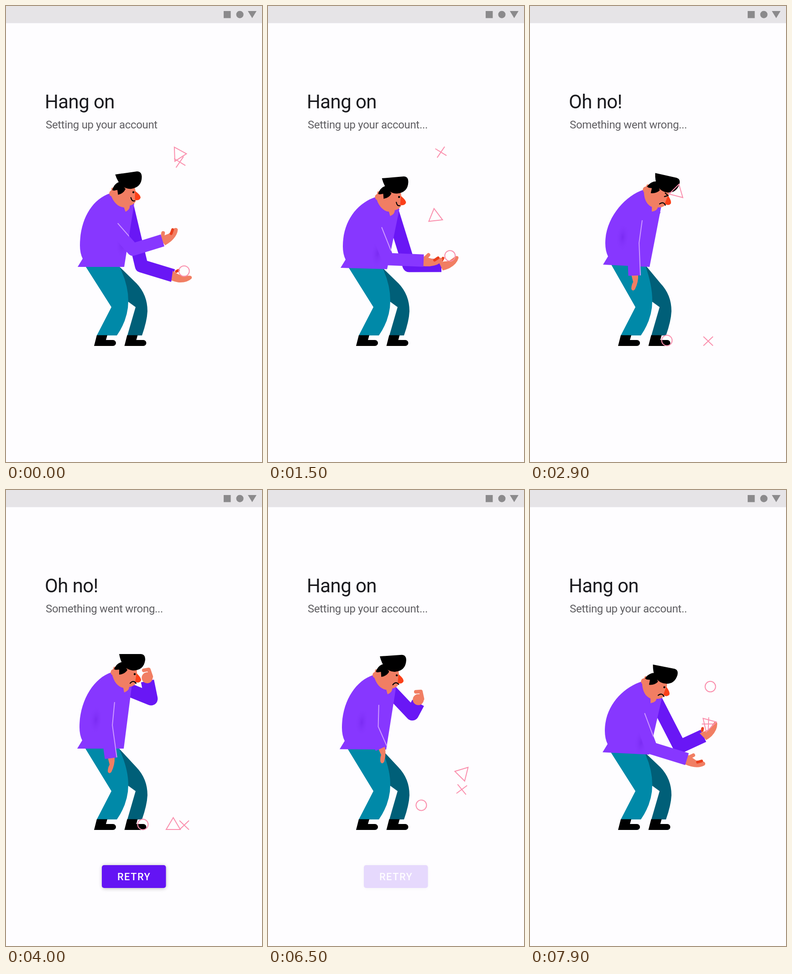
Animation of 561x998 px, one loop 8 s. Source, as an HTML page:

```html
<!DOCTYPE html>
<html lang="en">
<head>
<meta charset="utf-8">
<title>Account setup</title>
<style>
  html, body { margin: 0; width: 100%; height: 100%; overflow: hidden; background: #fefdff; }
  svg { display: block; width: 100vw; height: 100vh; }
  text { font-family: Roboto, sans-serif; }
  .title { font-size: 42px; letter-spacing: -.6px; fill: #1b1b1f; }
  .sub { font-size: 24px; letter-spacing: -.32px; fill: #5f5e62; }
  .label { font-size: 21.8px; font-weight: 500; letter-spacing: 1.5px; fill: #fff; }
  .skin { fill: #f17e63; }
  .sleeve { fill: none; stroke-linejoin: round; }
  .finger { fill: none; stroke: #f17e63; stroke-width: 8; stroke-linecap: round; stroke-linejoin: round; }
  .red { stroke: #ea3f1c; stroke-width: 6; }
  .line { fill: none; stroke: #000; stroke-width: 2.2; stroke-linecap: round; }
  .toy { fill: none; stroke: #fa8fad; stroke-width: 2; }
</style>
</head>
<body>
<svg viewBox="0 0 561 998">
  <defs>
    <radialGradient id="shade">
      <stop offset="0" stop-color="#6d20e6" stop-opacity=".5"/>
      <stop offset="1" stop-color="#8737ff" stop-opacity="0"/>
    </radialGradient>
    <clipPath id="side"><path id="sidePath"/></clipPath>
    <filter id="blur" x="-20%" y="-50%" width="140%" height="200%"><feGaussianBlur stdDeviation="4"/></filter>
  </defs>
  <rect width="561" height="998" fill="#fefdff"/>
  <rect width="561" height="37.5" fill="#e6e4e7"/>
  <g fill="#8b8a8c">
    <rect x="477" y="11" width="15.5" height="15.5"/>
    <circle cx="512.5" cy="18.7" r="8"/>
    <path d="M530 11h19l-9.5 15.5z"/>
  </g>

  <g id="wait">
    <text class="title" x="85" y="224">Hang on</text>
    <text class="sub" x="87" y="267.5" id="dots"></text>
  </g>
  <g id="fail">
    <text class="title" x="85" y="224">Oh no!</text>
    <text class="sub" x="87" y="267.5">Something went wrong...</text>
  </g>

  <path id="farArm" class="sleeve" stroke="#6917f5" stroke-width="29"/>
  <g id="farPalm">
    <path class="skin" d="M-2-10Q10-4 20-2L37-5Q43-4 41 1Q32 12 13 13Q5 13-2 11Z"/>
    <path class="finger red" d="M6-10L10-13"/>
  </g>
  <g id="farFist">
    <circle class="skin" cy="-7" r="12"/>
    <path class="finger" d="M-6-24L5-25L9-9"/>
  </g>

  <path id="farLeg" fill="#005f78"/>
  <path id="nearLeg" fill="#0089a8"/>
  <path id="shoe" d="M199 720.5H222L219 731H234.5A6.5 6.5 0 0 1 234.5 744H193Z"/>
  <use href="#shoe" x="66.5"/>

  <path id="torso" fill="#8737ff"/>
  <ellipse id="fold" rx="15" ry="32" fill="url(#shade)"/>
  <g id="head">
    <path class="skin" d="M-4 2C0 22 10 32 21 34L23 44Q34 40 34 32Q50 30 52 14L50-12H0Z"/>
    <path d="M0-5Q6-21 20-23L30-5Q24 4 12 5L12-6Z"/>
    <circle class="skin" r="6.8"/>
    <path fill="#fb4019" d="M50 2Q61 12 60 18Q56 25 47 21Z"/>
    <path d="M12-40H60Q70-39 69-27Q66-4 42-4Q18-6 12-40Z"/>
    <circle id="eye" cx="46" cy="4" r="2.2"/>
    <path id="wince" class="line" d="M43-2L50 2L43 6"/>
    <path id="smile" class="line" d="M39 15Q40 24 46 23"/>
    <path id="frown" class="line" d="M36 24Q43 16 49 24"/>
  </g>

  <g id="nearPalm">
    <path class="skin" d="M-2-10Q10-6 20-3L37-5Q43-3 41 2Q32 12 13 13Q5 13-2 12Z"/>
    <path class="finger" d="M1-3L11-12"/>
    <path id="tuck" class="finger red" d="M24 0L32-5"/>
  </g>
  <path id="nearHang" class="skin" d="M-7-2H8Q9 14 1 30Q-4 36-7 29Q-7 21-3 14Z"/>
  <path id="nearArm" class="sleeve" stroke="#8737ff" stroke-width="27"/>
  <path id="seam" class="sleeve" stroke="#cf9bff" stroke-width="2" clip-path="url(#side)"/>

  <path id="tri" class="toy" d="M0-17L15.5 9H-15.5Z"/>
  <path id="cross" class="toy" d="M-10.5-10L10.5 10M10.5-10L-10.5 10"/>
  <circle id="ring" class="toy" r="11.5"/>

  <g id="button">
    <rect id="shadow" x="211" y="823" width="139" height="50" rx="5" fill="#000" filter="url(#blur)"/>
    <rect x="210" y="821" width="140.5" height="50" rx="5" fill="#6414f4"/>
    <rect id="glow" x="210" y="821" width="140.5" height="50" rx="5" fill="#9055f8"/>
    <text class="label" x="244" y="854">RETRY</text>
  </g>
  <circle id="touch" cx="281" cy="845.5" r="33.5" fill="#f9567f"/>
</svg>
<script>
const LOOP = 8000, BEAT = 1200, DROP = 2000, RESUME = 7200;
const el = {};
document.querySelectorAll('[id]').forEach(e => el[e.id] = e);

const clamp = v => Math.min(1, Math.max(0, v));
const smooth = v => { v = clamp(v); return v * v * (3 - 2 * v); };
const ramp = (t, a, b) => smooth((t - a) / (b - a));
const mix = (a, b, k) => a.map((v, i) => v + (b[i] - v) * k);
const easeIn = k => 1 - Math.cos(k * Math.PI / 2);
const easeOut = k => Math.sin(k * Math.PI / 2);
const set = (id, name, value) => el[id].setAttribute(name, value);
const show = (id, v) => set(id, 'opacity', +v);
const place = (id, x, y, r = 0) => set(id, 'transform', `translate(${x} ${y}) rotate(${r})`);

// neck, chest, hem, hem tilt, head turn | near shoulder, elbow, wrist, hand turn | far elbow, wrist, hand turn
const low   = [228,410, 281,432, 157,571, 0, -8,  235,484, 278,533, 343,513, -38,  297,569, 366,590, 8];
const mid   = [236,418, 288,444, 159,573, 3, -5,  237,489, 263,554, 341,557, -2,   309,568, 380,568, -25];
const high  = [245,419, 290,451, 159,574, 5, 11,  239,493, 266,565, 344,589, 16,   328,562, 380,538, -44];
const hurt  = [249,402, 288,437, 160,566, 5, 12.5, 233,467, 226,518, 229,590, 0,   236,520, 236,545, 0];
const think = [231,399, 276,426, 156,566, 0, 0,   225,463, 220,515, 230,587, 0,    318,457, 310,418, -5];
const sorry = [232,403, 281,428, 157,566, 1, -4,  228,465, 211,516, 215,584, 0,    323,462, 316,422, 0];
const lowSad = low.slice();
lowSad[7] = -4;

function swing(p, base) {
  if (p < .25) return mix(base, mid, easeIn(p / .25));
  if (p < .5) return mix(mid, high, easeOut((p - .25) / .25));
  if (p < .6) return high;
  if (p < .8) return mix(high, mid, easeIn((p - .6) / .2));
  return mix(mid, base, easeOut((p - .8) / .2));
}
const beat = t => (t / BEAT) % 1;

const keys = [[DROP, swing(beat(DROP), low)], [2550, hurt], [3150, hurt], [3800, think],
  [4100, think], [4500, sorry], [6250, sorry], [7000, lowSad], [RESUME, lowSad]];

function poseAt(t) {
  if (t < DROP) return swing(beat(t), low);
  if (t >= RESUME) return swing(beat(t - RESUME), lowSad);
  const i = keys.findIndex(k => t < k[0]);
  const [t0, a] = keys[i - 1], [t1, b] = keys[i];
  const pose = mix(a, b, ramp(t, t0, t1));
  if (t > 4500 && t < 5500) pose[19] += 5 * Math.sin((t - 4500) * Math.PI / 250);
  return pose;
}

// spot above the far palm, with its turn
function palm(pose) {
  const [x, y, turn] = pose.slice(17), a = turn * Math.PI / 180;
  return [x + 26 * Math.cos(a) + 11 * Math.sin(a), y + 26 * Math.sin(a) - 11 * Math.cos(a), turn];
}

// a throw goes between two spots (x, y, turn); falls list time, spot and bounce height
const toys = {
  tri:   { start: .65, len: .68, rise: 202, from: [396, 500, -116], to: [362, 550, 279],
           falls: [[2900, 322, 407, 14, 90], [3450, 366.5, 734, 360, 50]] },
  cross: { start: .84, len: .66, rise: 238, from: [382, 500, -12], to: [377, 570, -12],
           falls: [[2450, 390.5, 733.5, 180, 40]] },
  ring:  { start: .525, len: .45, rise: 185, from: [396, 505, 0], to: [390, 580, 0],
           falls: [[2700, 300, 732, 0, 70]] }
};

function juggle(toy, p, hand, first) {
  const { start, len, rise, from, to } = toy;
  const since = (p - start + 1) % 1, u = since / len;
  if (u < 1 && !(first && p < start)) {
    const spot = mix(from, to, u);
    spot[1] -= rise * 4 * u * (1 - u);
    return spot;
  }
  const left = (start - p + 1) % 1;
  const held = first ? hand : mix(to, hand, smooth((since - len) / .15));
  return mix(held, from, smooth(1 - left / .06));
}

function toyAt(toy, t, hand, order) {
  if (t < DROP) return juggle(toy, beat(t), hand, false);
  if (t >= RESUME) return juggle(toy, beat(t - RESUME), hand, true);
  let t0 = DROP, at = juggle(toy, beat(DROP), palm(poseAt(DROP)), false);
  for (const [t1, x, y, turn, bounce] of toy.falls) {
    const next = [x, y, turn];
    if (t < t1) {
      const k = (t - t0) / (t1 - t0), spot = mix(at, next, k);
      spot[1] -= 4 * (bounce + Math.abs(y - at[1]) / 4) * k * (1 - k);
      return spot;
    }
    t0 = t1;
    at = next;
  }
  const lift = 6250 + order * 60, k = ramp(t, lift, lift + 680);
  const bend = [500, 500, 180];
  return mix(mix(at, bend, k), mix(bend, [...palm(lowSad).slice(0, 2), 368], k), k);
}

function normal(ax, ay, bx, by) {
  const d = Math.hypot(bx - ax, by - ay);
  return [(by - ay) / d, (ax - bx) / d];
}

function drawFigure(pose, t) {
  const [nx, ny, cx, cy, bx, by, tilt, turn, sx, sy, ex, ey, wx, wy, hand, fx, fy, vx, vy, fhand] = pose;
  const hem = `${bx + 102} ${by + tilt}`, hip = `${bx + 92} ${by}`;
  set('farLeg', 'd', `M${hip}L286 607Q310 632 310 668Q309 690 298 721H266L284 659L262 643Z`);
  set('nearLeg', 'd', `M${bx + 18} ${by}L231 659L199 721H243Q268 685 268 645Q268 610 ${hip}V${by - 5}H${bx + 18}Z`);
  set('torso', 'd', `M${nx} ${ny}C${nx - 40} ${ny + 13} ${bx + 5} ${by - 103} ${bx + 5} ${by - 47}` +
    `Q${bx + 5} ${by - 30} ${bx + 11} ${by - 18}L${bx} ${by}L${hem}L${cx} ${cy}Z`);
  set('sidePath', 'd', `M0 300H${cx}V${cy}L${hem}V650H0Z`);
  place('head', nx + 5, ny, turn);
  place('fold', ex - 23, ey - 12, 5);

  set('nearArm', 'd', `M${sx} ${sy}L${ex} ${ey}L${wx} ${wy}`);
  const a = normal(sx, sy, ex, ey), b = normal(ex, ey, wx, wy);
  const m = 13 / (1 + a[0] * b[0] + a[1] * b[1]);
  set('seam', 'd', `M${sx + 13 * a[0]} ${sy + 13 * a[1]}L${ex + m * (a[0] + b[0])} ${ey + m * (a[1] + b[1])}` +
    `L${wx + 13 * b[0]} ${wy + 13 * b[1]}`);
  place('nearPalm', wx, wy, hand);
  place('nearHang', wx, wy, hand);

  set('farArm', 'd', `M${cx - 15} ${cy + 8}L${fx} ${fy}L${vx} ${vy}`);
  place('farPalm', vx, vy, fhand);
  place('farFist', vx, vy, fhand);

  const hanging = t > 2300 && t < 6550, raised = t > 3350 && t < 6550;
  show('nearPalm', !hanging);
  show('nearHang', hanging);
  show('farPalm', t < 2450 || t > 6550);
  show('farFist', raised);
  show('tuck', t < DROP || t > 7400);

  const wince = t > 2600 && t < 3300, sad = t > 2200;
  show('wince', wince);
  show('eye', !wince);
  show('smile', !sad);
  show('frown', sad);
}

function drawScreen(t) {
  const failed = ramp(t, 2150, 2300) - ramp(t, 6230, 6380);
  show('fail', failed);
  show('wait', 1 - failed);
  const steps = Math.floor((t < 4000 ? t : t - 5800) / 200);
  el.dots.textContent = 'Setting up your account' + '.'.repeat((steps % 4 + 4) % 4);

  show('button', ramp(t, 3720, 3920) - ramp(t, 6350, 6550));
  const press = ramp(t, 5700, 5950) - ramp(t, 6150, 6350);
  show('glow', press);
  show('shadow', .28 + .14 * press);
  set('shadow', 'y', 822 + 4 * press);
  show('touch', ramp(t, 5550, 5750) - ramp(t, 6120, 6300));
}

const begin = performance.now();
function frame() {
  const t = Math.max(0, performance.now() - begin) % LOOP;
  const pose = poseAt(t), hand = palm(pose);
  drawScreen(t);
  drawFigure(pose, t);
  Object.keys(toys).forEach((id, i) => place(id, ...toyAt(toys[id], t, hand, i)));
  requestAnimationFrame(frame);
}
frame();
</script>
</body>
</html>
```
